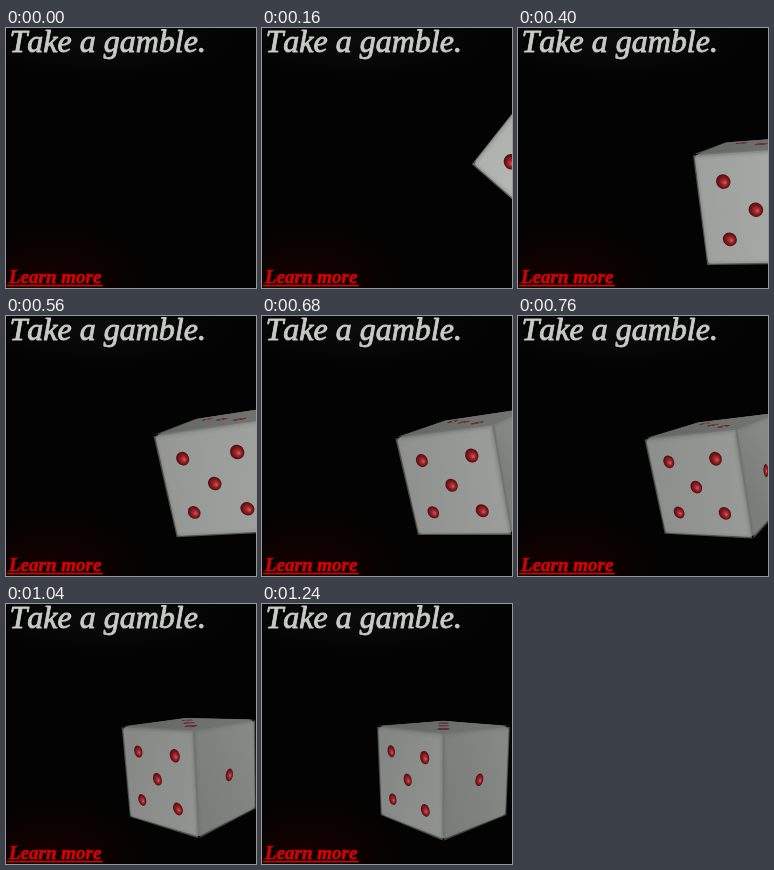
An HTML page with a canvas that plays this animation: 250x260 px, repeating every 1.8 s.

```html
<!DOCTYPE html>
<html lang="en">
<head>
<meta charset="utf-8">
<title>Take a gamble</title>
<style>
html, body { margin: 0; width: 100%; height: 100%; overflow: hidden; background: #020302; }
canvas { display: block; }
</style>
</head>
<body>
<canvas id="stage" width="250" height="260"></canvas>
<script>
const ctx = document.getElementById('stage').getContext('2d');
const LOOP = 1800, STEP = 40, LAND = 400, REST = 1240;
const DISTANCE = 7.5, PITCH = 0.22, BEVEL = 0.1;

const gray = v => `rgb(${v},${v + 2},${v - 1})`;

// The die tumbles in from the right, lands, hops and turns until it rests.
function motion(t) {
  const p = t / REST;
  const left = (1 - p) ** 2;
  const fall = Math.max(0, 1 - t / LAND);
  const s = Math.max(0, (t - LAND) / (REST - LAND));
  const settle = (1 - s) ** 2;
  return {
    x: 181.5 + 145 * left + 36 * fall ** 2,
    y: 168 - 77 * fall - 54 * Math.sqrt(s) * settle,
    size: 46 + 13 * left,
    yaw: Math.PI / 4 * p * p * (3 - 2 * p),
    roll: (0.09 + s) * settle - 1.32 * fall,
    tone: 140 + 60 * left
  };
}

// Maps die coordinates (right, down, front) to the stage.
function projector({ x: cx, y: cy, size, yaw, roll }) {
  const turn = (a, b, angle) => [
    a * Math.cos(angle) - b * Math.sin(angle),
    a * Math.sin(angle) + b * Math.cos(angle)
  ];
  return ([x, y, z]) => {
    [x, z] = turn(x, z, yaw);
    [z, y] = turn(z, y, PITCH);
    [x, y] = turn(x, y, -roll);
    const scale = size * DISTANCE / (DISTANCE - z);
    return [cx + x * scale, cy + y * scale];
  };
}

const cross = (a, b, c) => (b[0] - a[0]) * (c[1] - a[1]) - (b[1] - a[1]) * (c[0] - a[0]);

function hull(points) {
  points.sort((a, b) => a[0] - b[0] || a[1] - b[1]);
  const half = list => {
    const out = [];
    for (const p of list) {
      while (out.length > 1 && cross(out[out.length - 2], out[out.length - 1], p) <= 0) out.pop();
      out.push(p);
    }
    return out.slice(0, -1);
  };
  return [...half(points), ...half([...points].reverse())];
}

function polygon(points) {
  ctx.beginPath();
  points.forEach(p => ctx.lineTo(...p));
  ctx.closePath();
}

function drawPip(at, u, v, radius = 0.125) {
  const [x, y] = at(u, v), [ux, uy] = at(u + radius, v), [vx, vy] = at(u, v + radius);
  ctx.save();
  ctx.transform(ux - x, uy - y, vx - x, vy - y, x, y);
  const g = ctx.createRadialGradient(0.25, 0.2, 0, 0, 0, 1);
  g.addColorStop(0, '#c8655e');
  g.addColorStop(0.35, '#a82a2c');
  g.addColorStop(0.75, '#74141a');
  g.addColorStop(1, '#420e10');
  ctx.fillStyle = g;
  ctx.beginPath();
  ctx.arc(0, 0, 1, 0, Math.PI * 2);
  ctx.fill();
  ctx.restore();
}

const corners = [[-1, -1], [1, -1], [1, 1], [-1, 1]];

function drawFace(at, tone, pips) {
  const [a, b, c] = corners.map(([u, v]) => at(u, v));
  if (cross(a, b, c) <= 0) return;
  const light = ctx.createLinearGradient(...at(-1, 0), ...at(1, 0));
  light.addColorStop(0, gray(tone - 6));
  light.addColorStop(1, gray(tone + 6));
  ctx.fillStyle = light;
  ctx.globalAlpha = 0.5;
  for (let k = 0.98; k > 0.88; k -= 0.03) {
    polygon(corners.map(([u, v]) => at(u * k, v * k)));
    ctx.fill();
  }
  ctx.globalAlpha = 1;
  pips.forEach(([u, v]) => drawPip(at, u, v));
}

function drawDie(t) {
  const pose = motion(t), project = projector(pose);
  const inner = 1 - BEVEL;
  const points = [-inner, inner].flatMap(z =>
    corners.map(([x, y]) => project([x * inner, y * inner, z])));
  polygon(hull(points));
  ctx.fillStyle = ctx.strokeStyle = gray(112);
  ctx.lineJoin = 'round';
  ctx.lineWidth = 2 * BEVEL * pose.size;
  ctx.fill();
  ctx.stroke();

  const five = [[0, 0], ...corners.map(([u, v]) => [u * 0.51, v * 0.51])];
  const three = [-0.5, 0, 0.5].map(d => [d, d]);
  drawFace((u, v) => project([u, -1, v]), 108, three);
  drawFace((u, v) => project([1, v, -u]), 130, [[0, 0]]);
  drawFace((u, v) => project([u, v, 1]), Math.round(pose.tone), five);
}

function glow(x, y, rx, ry, color) {
  ctx.save();
  ctx.translate(x, y);
  ctx.scale(rx, ry);
  const g = ctx.createRadialGradient(0, 0, 0, 0, 0, 1);
  g.addColorStop(0, `rgba(${color},1)`);
  g.addColorStop(1, `rgba(${color},0)`);
  ctx.fillStyle = g;
  ctx.fillRect(-1, -1, 2, 2);
  ctx.restore();
}

function label(text, x, y, font, color, weight) {
  ctx.font = `${font} "Liberation Serif", "Times New Roman", serif`;
  ctx.fontKerning = 'none';
  ctx.fillStyle = ctx.strokeStyle = color;
  ctx.lineWidth = weight;
  ctx.fillText(text, x, y);
  ctx.strokeText(text, x, y);
}

function draw(t) {
  ctx.fillStyle = '#020302';
  ctx.fillRect(0, 0, 250, 260);
  glow(100, 14, 130, 34, '11,12,11');
  glow(45, 255, 95, 62, '24,0,0');
  drawDie(t);
  label('Take a gamble.', 3.5, 24, 'italic 32px', '#c8cac8', 0.9);
  label('Learn more', 3, 255, 'italic bold 19px', '#d00404', 0.6);
  ctx.fillRect(1, 256.8, 96, 1.6);
}

const start = performance.now();
function frame() {
  const t = (performance.now() - start) % LOOP;
  draw(Math.min(REST, Math.floor(t / STEP) * STEP));
  requestAnimationFrame(frame);
}
frame();
</script>
</body>
</html>
```
